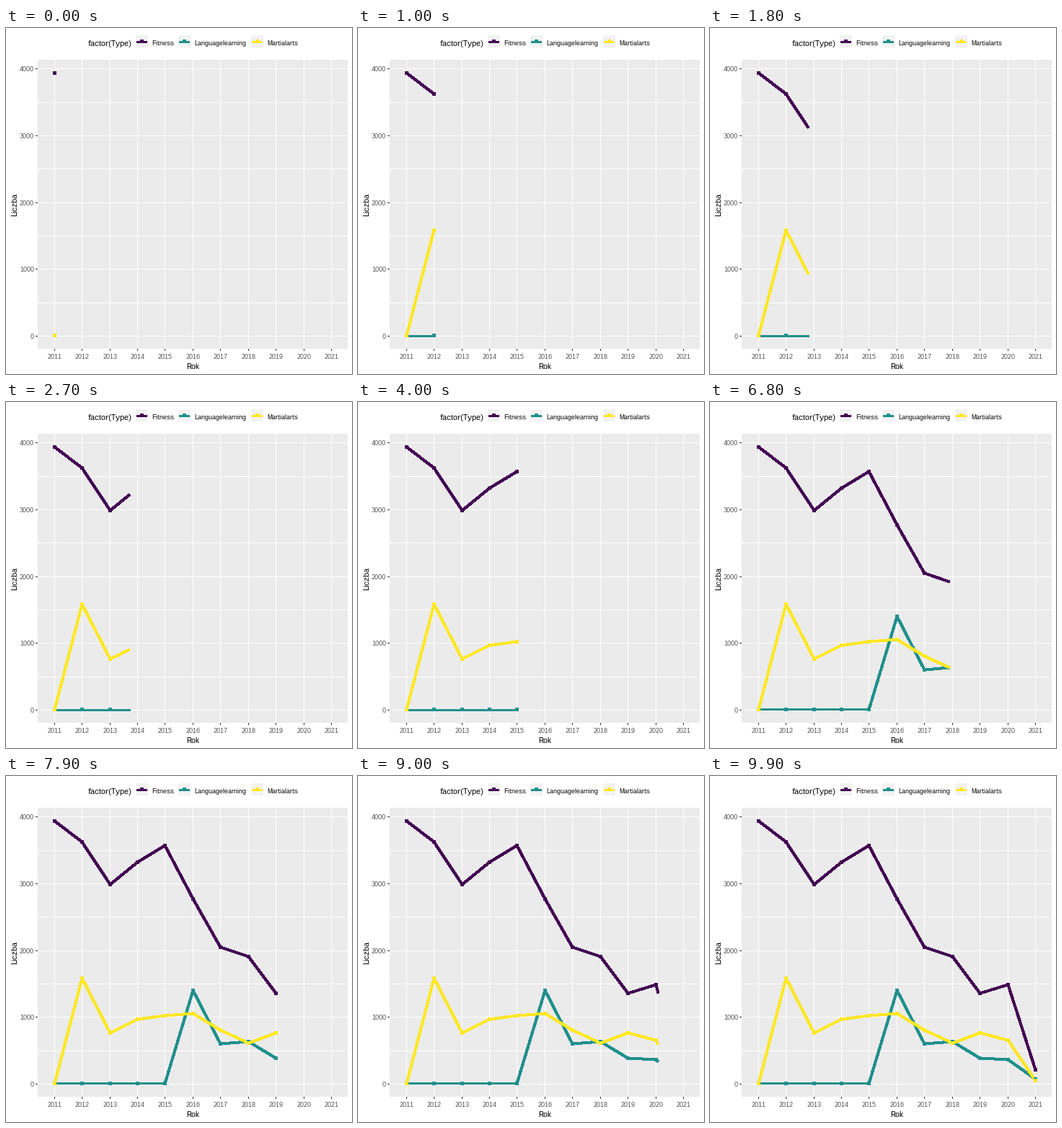
These frames come from a looping animation (480x480 px, 10 s). A matplotlib script:

```python
import numpy as np
import matplotlib.pyplot as plt
from matplotlib.animation import FuncAnimation
from matplotlib.patches import Circle, Rectangle

SIZE, DPI = 480, 80
PX = 72 / DPI  # points per pixel
FRAMES, INTERVAL = 100, 100
LEFT, RIGHT, TOP, BOTTOM = 44, 474, 44, 445

plt.rcParams.update({
    "font.family": "Liberation Sans",
    "text.hinting": "native",
    "text.hinting_factor": 1,
})

YEARS = np.arange(2011, 2022)
STEPS = np.arange(len(YEARS))
SERIES = [
    ("Fitness", "#440154", 180,
     [3943, 3630, 2990, 3325, 3575, 2770, 2050, 1915, 1360, 1485, 220]),
    ("Languagelearning", "#21908C", 239,
     [8, 8, 8, 8, 8, 1400, 605, 640, 390, 370, 75]),
    ("Martialarts", "#FDE725", 340,
     [8, 1590, 765, 975, 1025, 1060, 810, 615, 765, 660, 55]),
]

# Each year is reached on a whole frame; the head moves evenly in between.
KEYS = [round(k * (FRAMES - 1) / 10) for k in STEPS]


def x_px(k):
    return 67.3 + 38.42 * np.asarray(k)


def y_px(value):
    return 427.55 - 0.0927 * np.asarray(value)


def snap(p):
    """Centre of the pixel that holds p."""
    return np.floor(p) + 0.5


fig = plt.figure(figsize=(SIZE / DPI, SIZE / DPI), dpi=DPI, facecolor="white")
ax = fig.add_axes([0, 0, 1, 1])
ax.set_xlim(0, SIZE)
ax.set_ylim(SIZE, 0)
ax.axis("off")


def rect(x, y, w, h, color, z=0):
    ax.add_patch(Rectangle((x, y), w, h, fc=color, lw=0, aa=False, zorder=z))


def label(x, y, s, size=9, color="black", **kw):
    kw.setdefault("va", "baseline")
    ax.text(x, y, s, fontsize=size * PX, color=color, **kw)


def stroke(x, y, color, z):
    return ax.plot(x, y, color=color, lw=3 * PX, aa=False, zorder=z,
                   solid_capstyle="butt", solid_joinstyle="round")[0]


def dot(x, y, color, z):
    return ax.add_patch(Circle((x, y), 2.5, fc=color, lw=0, aa=False,
                               zorder=z))


def draw_panel():
    for value in range(0, 4001, 500):
        y = int(y_px(value))
        rect(LEFT, y, RIGHT - LEFT, 1, "white", 1)
        if value % 1000 == 0:
            rect(LEFT - 3, y, 3, 1, "#333333", 1)
            label(39, y + 4, str(value), color="#4D4D4D", ha="right")
    for k, year in enumerate(YEARS):
        x = int(x_px(k))
        rect(x, TOP, 1, BOTTOM - TOP, "white", 1)
        rect(x, BOTTOM, 1, 3, "#333333", 1)
        label(x + 0.5, 459, str(year), color="#4D4D4D", ha="center")
    rect(LEFT, TOP, RIGHT - LEFT, BOTTOM - TOP, "#EBEBEB")
    label(259, 473, "Rok", 11, ha="center")
    label(12.5, 245, "Liczba", 11, ha="center", va="center", rotation=90)


def draw_legend():
    label(114, 25, "factor(Type)", 11)
    for name, color, x, _ in SERIES:
        rect(x, 10, 17, 17, "#F2F2F2")
        stroke([x + 1, x + 15], [18.5, 18.5], color, 2)
        dot(x + 8.5, 18.5, color, 3)
        label(x + 22, 24, name)


draw_panel()
draw_legend()

xs = snap(x_px(STEPS))
tracks = []
for n, (_, color, _, values) in enumerate(SERIES):
    ys = snap(y_px(values))
    dots = [dot(x, y, color, 8 + n) for x, y in zip(xs, ys)]
    tracks.append((ys, stroke([], [], color, 4 + n), dots))


def update(i):
    head = np.interp(i, KEYS, STEPS)
    seen = int(head) + 1
    hx = snap(np.interp(head, STEPS, x_px(STEPS)))
    moving = hx > xs[seen - 1]
    artists = []
    for ys, line, dots in tracks:
        px, py = xs[:seen], ys[:seen]
        if moving:
            px = np.append(px, hx)
            py = np.append(py, snap(np.interp(head, STEPS, ys)))
        line.set_data(px, py)
        line.set_visible(i > 0)
        for k, point in enumerate(dots):
            point.set_visible(k < seen)
        artists += [line, *dots]
    return artists


anim = FuncAnimation(fig, update, frames=FRAMES, interval=INTERVAL,
                     repeat=True, repeat_delay=0, blit=False)
plt.show()
```
